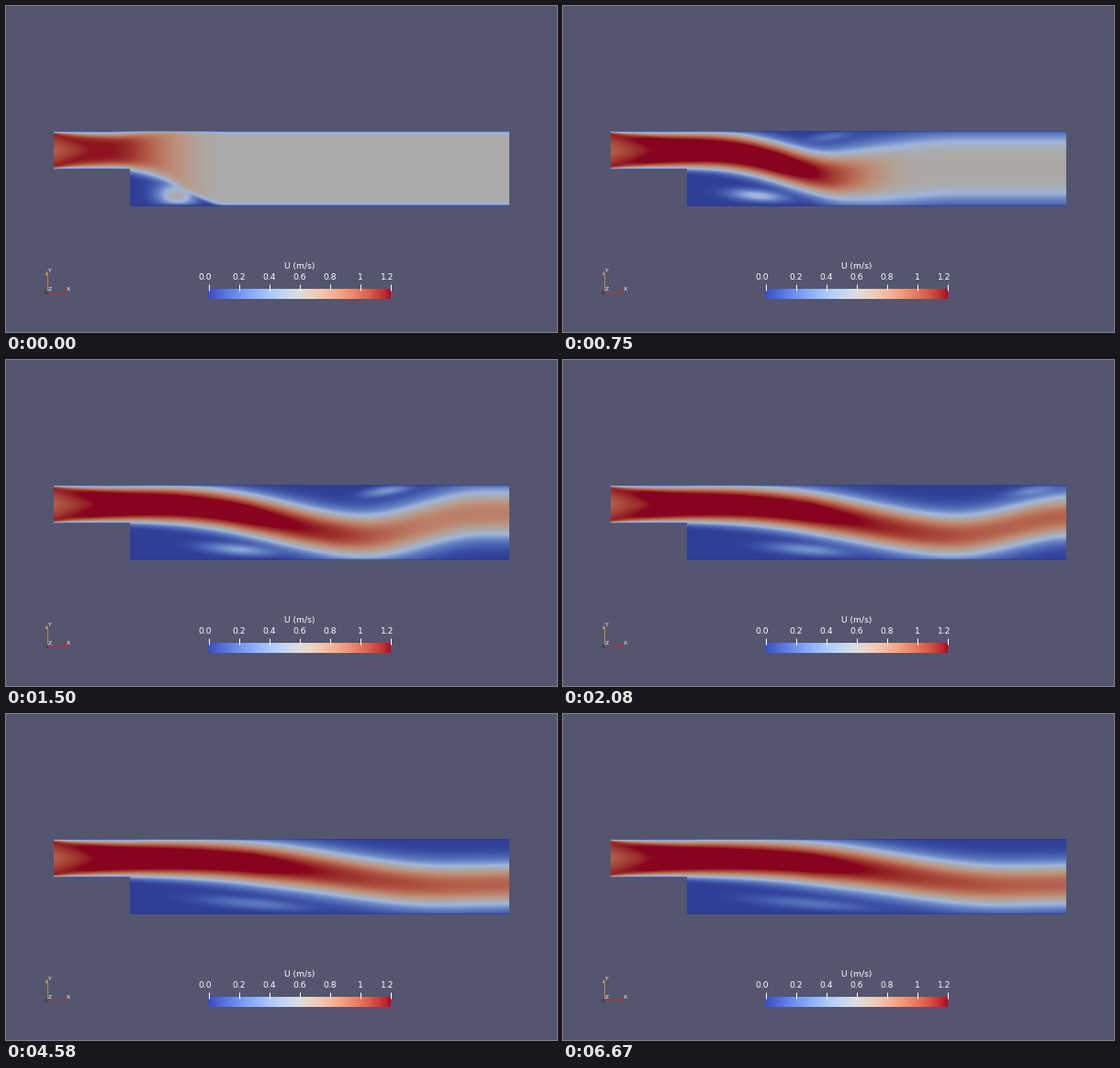
A matplotlib script that plays this animation: 600 px wide and 355 px high, repeating every 6.76 s.

```python
import numpy as np
import matplotlib.pyplot as plt
from matplotlib.animation import FuncAnimation

W, H, DPI = 600, 355, 100
LOOP, STEPS = 6760, 81
LEFT, STEP_X, RIGHT = 51.5, 135, 547.5
TOP, STEP_Y, BOTTOM = 136.5, 178, 218.5
INLET_Y = 157.7
U_MAX = 1.2
BACKGROUND = (83 / 255, 86 / 255, 110 / 255)

xs = np.arange(LEFT, RIGHT) + .5
X, Y = np.meshgrid(xs, np.arange(TOP, BOTTOM) + .5)
solid = (X < STEP_X) & (Y > STEP_Y)
floor = np.where(X < STEP_X, STEP_Y + .5, BOTTOM)
wall = np.tanh(np.clip(np.minimum(Y - TOP, floor - Y), 0, None) / 1.2)

# Wedge of accelerating fluid behind the inlet
wedge = np.clip((X - LEFT) / 55 + .9 * (np.abs(Y - INLET_Y) / 20) ** 1.5, 0, 1.3)
inlet_peak = .98 + .27 * wedge

# Fixed shape of the jet: it widens and its edges soften along the channel
jet_half = (18 + 2.5 * np.exp(-(xs - LEFT) / 25)
            + 2.2 * np.clip((xs - STEP_X) / 165, 0, 1))
jet_power = (2.2 + 2.3 * np.exp(-(xs - STEP_X) / 90)
             + 12 * np.exp(-(xs - LEFT) / 12))


def decay(t, tau, power=1):
    return np.exp(-(t / tau) ** power)


def ease(u):
    u = np.clip(u, 0, 1)
    return u * u * (3 - 2 * u)


def blend(a, b, w):
    return a + (b - a) * w


def streak(x, y, length, height, slope, speed):
    dy = Y - y - slope * (X - x)
    return speed * np.exp(-((X - x) / length) ** 2 - (dy / height) ** 2)


def speed_field(t):
    front = 480 - 330 * decay(t, 1100)
    trough = max(front, 240)
    swing = decay(abs(t - 1500), 1100, 2)
    start = decay(t, 700, 2)

    # Centre line: dips towards the trough, then swings back up
    dip = (29.5 + 5 * swing) * (1 - .36 * start)
    rise = (2 + 23 * swing) * (1 - start)
    down = np.clip((xs - STEP_X) / (trough - STEP_X), 0, 1) ** 1.4
    centre = INLET_Y + dip * ease(down) - rise * ease((xs - trough) / 130)

    # Jet core weakens downstream, and gives way to the plug flow at the front
    core_end = 270 - 135 * decay(t, 500)
    loss = np.clip((xs - core_end) / 300, 0, 1)
    core = 1.32 - .14 * decay(t, 150) - .35 * loss * (2 - loss)
    plug = ease((xs - front + 40) / 130)
    peak = blend(core, .97 - .37 * decay(t, 1350, 4), plug)
    half = blend(jet_half, 20.2 + 20.5 * decay(t, 1050, 2), plug)
    power = blend(jet_power, 2.3 + 22 * decay(t, 250), plug ** 3)
    jet = np.minimum(peak, inlet_peak) * .5 ** (np.abs(Y - centre) / half) ** power

    lower = streak(270 - 85 * decay(t, 1100, 2), 207,
                   77 - 55 * decay(t, 3500), 6.5 + 8 * decay(t, 150),
                   .08, .2 + .4 * decay(t, 1900))
    lower *= np.tanh((BOTTOM - Y) / 3) * (X > STEP_X)
    upper = streak(180 + .165 * t, 143, 27, 5.5, -.15, .36 * swing)
    return np.sqrt(jet ** 2 + lower ** 2 + upper ** 2 + .02 ** 2) * wall


# Lit surface colours are a dimmer version of the legend colours
levels = np.linspace(0, 1, 256)
legend = plt.colormaps["coolwarm"](levels)[:, :3]
light = .76 + .1 * np.exp(-((levels - .37) / .09) ** 2)
surface = np.clip(legend * light[:, None], 0, 1)


def render(t):
    index = np.clip(speed_field(t) / U_MAX * 255, 0, 255).astype(int)
    rgb = surface[index]
    rgb[solid] = BACKGROUND
    return rgb


fig = plt.figure(figsize=(W / DPI, H / DPI), dpi=DPI, facecolor=BACKGROUND)
ax = fig.add_axes([0, 0, 1, 1])
ax.axis("off")


def label(x, y, text, size=9.2):
    ax.text(x, y, text, color="white", fontsize=size * 72 / DPI,
            family="DejaVu Sans", ha="center", va="center_baseline")


def line(x, y, color, width=1.0):
    ax.plot(x, y, color=color, lw=width * 72 / DPI, solid_capstyle="butt")


flow = ax.imshow(render(0), extent=(LEFT, RIGHT, BOTTOM, TOP),
                 interpolation="nearest", aspect="auto")

# Legend, with the outer labels pulled slightly left
ax.imshow(legend[None], extent=(220, 419, 319, 308),
          interpolation="nearest", aspect="auto")
label(320, 282.5, "U (m/s)")
for i, text in enumerate("0.0 0.2 0.4 0.6 0.8 1 1.2".split()):
    tick = 220.5 + 33 * i
    line([tick, tick], [303, 310], "white")
    label(tick - (3.5 if i % 6 == 0 else 0), 295, text)

# Orientation axes
line([44.5, 44.5], [310, 291], "#b98548")
line([44.5, 63], [310.5, 310.5], "#a83a42")
ax.fill([43, 46, 44.5], [293, 293, 288.5], color="#d8a050", lw=0)
ax.fill([63, 63, 68], [309, 312, 310.5], color="#d02020", lw=0)
ax.fill([41.5, 46, 46, 41.5], [309.5, 309.5, 314, 314], color="#46484f", lw=0)
label(47, 288.5, "Y", 6)
label(67.5, 308, "X", 6)
label(48, 308, "Z", 6)

ax.set_xlim(0, W)
ax.set_ylim(H, 0)


def update(i):
    flow.set_data(render(i * LOOP / STEPS))
    return [flow]


anim = FuncAnimation(fig, update, frames=STEPS, interval=LOOP / STEPS,
                     repeat=True, repeat_delay=0, blit=False)
plt.show()
```
